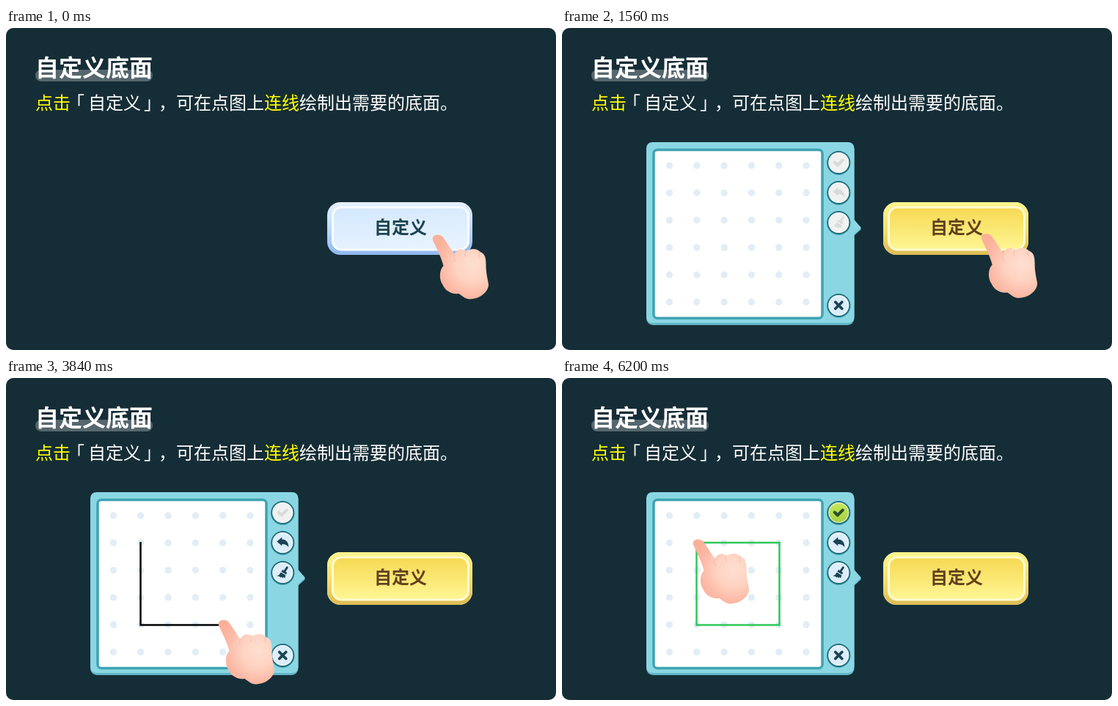
Animation of 750x440 px, one loop 7.2 s. Source, as an HTML page:

```html
<!DOCTYPE html>
<html lang="zh-CN">
<head>
<meta charset="utf-8">
<style>
html, body { margin: 0; width: 100%; height: 100%; overflow: hidden; background: #fff; }
svg { display: block; font-family: "Noto Sans CJK SC", "Noto Sans CJK", sans-serif; }
.bold { font-weight: 700; }
.dot { fill: #e2edf5; }
.yellow { fill: #ff0; }
</style>
</head>
<body>
<svg width="750" height="440" viewBox="0 0 750 440">
  <defs>
    <linearGradient id="blueRim" x2="0" y2="1"><stop stop-color="#e6f3ff"/><stop offset=".55" stop-color="#b9d8fc"/><stop offset="1" stop-color="#8fb7ee"/></linearGradient>
    <linearGradient id="blueFace" x2=".3" y2="1"><stop stop-color="#d3e7fd"/><stop offset="1" stop-color="#e6f3ff"/></linearGradient>
    <linearGradient id="goldRim" x2="0" y2="1"><stop stop-color="#fef68e"/><stop offset=".55" stop-color="#f5dd6a"/><stop offset="1" stop-color="#dcbc55"/></linearGradient>
    <linearGradient id="goldFace" x2="0" y2="1"><stop stop-color="#f6d952"/><stop offset="1" stop-color="#fef695"/></linearGradient>
    <linearGradient id="green" x2="0" y2="1"><stop stop-color="#c9e85f"/><stop offset="1" stop-color="#a2d040"/></linearGradient>
    <radialGradient id="skin" gradientUnits="userSpaceOnUse" cx="50" cy="37" r="56">
      <stop stop-color="#ffdfd0"/><stop offset=".4" stop-color="#fed3c2"/><stop offset=".78" stop-color="#fcb8a4"/><stop offset="1" stop-color="#fbb09a"/>
    </radialGradient>
  </defs>

  <rect width="750" height="440" rx="10" fill="#152d36"/>
  <rect x="40" y="57" width="160" height="16" rx="8" fill="#56676e"/>
  <text class="bold" x="40" y="66" font-size="32" fill="#fff">自定义底面</text>
  <text x="40" y="111" font-size="24" fill="#fff"><tspan class="yellow">点击</tspan><tspan dx="-5">「</tspan><tspan x="112">自定义</tspan><tspan dx="4">」</tspan><tspan x="208">，可在点图上</tspan><tspan class="yellow">连线</tspan>绘制出需要的底面。</text>

  <g id="panel">
    <path d="M397 264L408 275L397 285Z" fill="#62b6c6"/>
    <rect x="115" y="157" width="283.500" height="249" rx="9" fill="#62b6c6"/>
    <path d="M124 156H389.500Q398.500 156 398.500 165V262L408 273L398.500 282V394Q398.500 403 389.500 403H124Q115 403 115 394V165Q115 156 124 156Z" fill="#8ad7e3"/>
    <rect x="125" y="166.500" width="230" height="230" rx="5" fill="#fff" stroke="#3fa3b1" stroke-width="3.500"/>
    <g id="dots"></g>
    <g id="tools"></g>
    <path id="line" d="M183.500 224V337.500H296.500V225H182.500" pathLength="4" fill="none" stroke-width="2.500"/>
  </g>

  <g id="button"></g>

  <g id="hand">
    <path fill="url(#skin)" d="M-4 4C-7-2-1-6 5-4C9-3 11 1 13 4L25 22C28 15 36 13 41 18C47 14 56 14 60 19C67 21 68 28 68 36C68 48 70 54 71.500 63C72 71 64 79 55 82C48 84 42 84 38 81L31 76C22 77 13 73 9 64C4 57 4 44 10 38C7 26 1 15-4 4Z"/>
    <path d="M25 22C23 26 24 29 26 32M41 18C39 20 39 22 40 25M60 19C58 21 58 23 59 26" fill="none" stroke="#fbb8a4" stroke-width="1.500" stroke-linecap="round" opacity=".6"/>
  </g>
</svg>
<script>
const LOOP = 7200, STEP = 40;
const $ = id => document.getElementById(id);

const icons = {
  check: '<path d="M-5.500-.5L-1.500 3.500L5.500-3.500" fill="none" stroke="currentColor" stroke-width="4" stroke-linecap="round" stroke-linejoin="round"/>',
  undo: '<path d="M-8-1.500L-1-7.500V-4.500C5-4.500 8-.5 8 6.500C6 3 3 2 -1 2V4.500Z" fill="currentColor"/>',
  broom: '<path d="M6-7L3-2.500" stroke="currentColor" stroke-width="3" stroke-linecap="round"/><path d="M0-4L6 0L4.500 2.500L-2-1.500ZM-2.500-.5L4 3.500L3 7.500L1 6L0 7.500L-2 5.500L-3 7L-4.500 5L-8 5Q-4 3-2.500-.5Z" fill="currentColor"/>',
  close: '<path d="M-4.500-4.500L4.500 4.500M4.500-4.500L-4.500 4.500" stroke="currentColor" stroke-width="3.800" stroke-linecap="round"/>'
};

function tool(id, y, icon, fill, color) {
  return `<g id="${id}" transform="translate(377.300 ${y})" color="${color}">
    <circle cy="1" r="16" fill="#4fa9b8"/>
    <circle r="15" fill="${fill}" stroke="#22707f" stroke-width="2"/>
    <circle r="13.300" fill="none" stroke="#fff" stroke-opacity=".55" stroke-width="1.400"/>${icons[icon]}</g>`;
}
const off = (id, y, icon) => tool(id, y, icon, '#f0f1f1', '#d9dada');
const on = (id, y, icon) => tool(id, y, icon, '#dcedfc', '#1b4452');

$('tools').innerHTML = off('checkOff', 184, 'check') + tool('checkOn', 184, 'check', 'url(#green)', '#2a4f28') +
  off('undoOff', 225, 'undo') + on('undoOn', 225, 'undo') +
  off('broomOff', 266, 'broom') + on('broomOn', 266, 'broom') + on('closeOn', 379, 'close');

let dots = '';
for (let i = 0; i < 36; i++)
  dots += `<circle class="dot" cx="${146.5 + 37.3 * (i % 6)}" cy="${188 + 37.3 * Math.floor(i / 6)}" r="4.700"/>`;
$('dots').innerHTML = dots;

const face = (id, name, rim, color) => `<g id="${id}">
  <rect x="438" y="238" width="198" height="72" rx="18" fill="url(#${name}Rim)"/>
  <rect x="445.500" y="245" width="185" height="58" rx="12" fill="url(#${name}Face)" stroke="${rim}" stroke-width="3"/>
  <text class="bold" x="538" y="281" font-size="24" text-anchor="middle" fill="${color}">自定义</text></g>`;
$('button').innerHTML = face('blue', 'blue', '#f8fcff', '#1c4250') + face('gold', 'gold', '#fffad0', '#643f1c');

const ramp = (t, a, b) => Math.min(1, Math.max(0, (t - a) / (b - a)));
const ease = p => (1 - Math.cos(Math.PI * p)) / 2;

// start, end, hand x, hand y
const moves = [
  [1520, 1920, 183.5, 225],
  [2600, 2960, 183.5, 335],
  [3560, 3840, 294.5, 335],
  [4400, 4760, 293.5, 224],
  [5360, 5720, 183.5, 225]
];

function show(id, enabled) {
  $(id + 'On').style.display = enabled ? '' : 'none';
  $(id + 'Off').style.display = enabled ? 'none' : '';
}

function draw(now) {
  const t = Math.floor(now % LOOP / STEP) * STEP;
  let x = 586.5, y = 287, drawn = 0;
  moves.forEach(([a, b, toX, toY], i) => {
    const p = ease(ramp(t, a, b));
    x += (toX - x) * p;
    y += (toY - y) * p;
    if (i) drawn += p;
  });
  $('hand').setAttribute('transform', `translate(${x} ${y})`);
  $('gold').setAttribute('opacity', ramp(t, 320, 600));
  $('panel').setAttribute('opacity', ramp(t, 636, 880));

  const g = ramp(t, 6120, 6200);
  const line = $('line');
  line.style.display = drawn ? '' : 'none';
  line.setAttribute('stroke-dasharray', `${drawn} 9`);
  line.setAttribute('stroke', `rgb(${47 * g},${200 * g},${90 * g})`);

  show('undo', t >= 3080);
  show('broom', t >= 3080);
  show('check', t >= 5760);
}

const start = performance.now();
function tick() {
  draw(performance.now() - start);
  requestAnimationFrame(tick);
}
tick();
</script>
</body>
</html>
```
